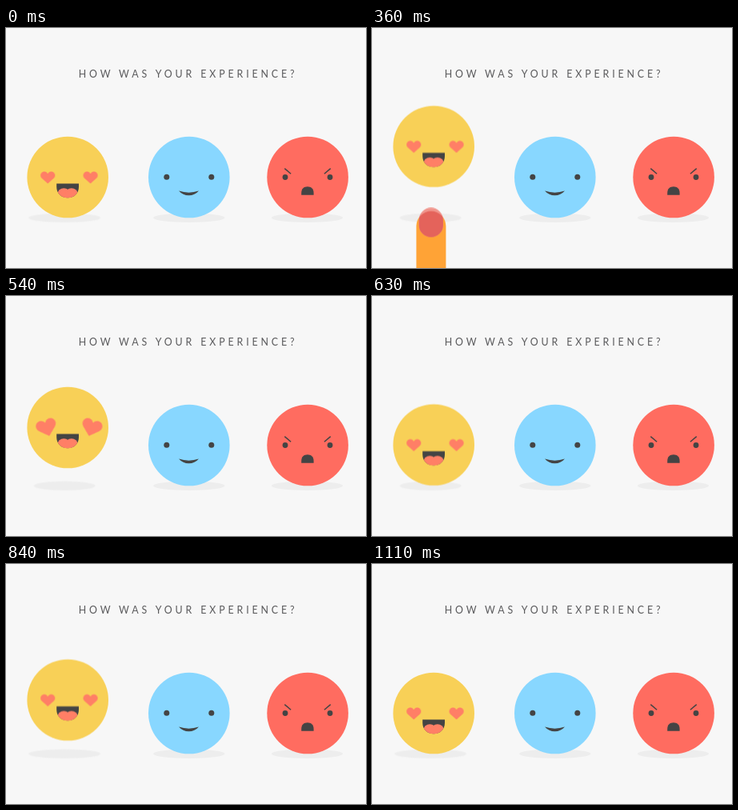
Recreate the animation shown at these times as an HTML page without scripts. Size 450 px wide and 300 px high, loop 3600 ms.

```html
<!DOCTYPE html>
<html lang="en">
<head>
<meta charset="utf-8">
<title>How was your experience?</title>
<style>
  html, body { margin: 0; width: 100%; height: 100%; overflow: hidden; background: #f7f7f7; }
  svg { display: block; width: 100vw; height: 100vh; }

  .title { font: 400 12.4px Lato, sans-serif; letter-spacing: 3.87px; fill: #5a5a5c; text-anchor: middle; }
  .shade { fill: #ededed; }
  .dark { fill: #444; }
  .heart, .tongue { fill: #ff7f66; }
  .brow { stroke: #444; stroke-width: 1.5; }

  .love, .love-shade, .heart, .finger { animation: 3600ms linear infinite; }
  .love { animation-name: bounce; }
  .love-shade { animation-name: shrink; }
  .heart { animation-name: pop; }
  .finger { animation-name: poke; }

  /* three bounces, each lower than the last; quadratic rise and fall */
  @keyframes bounce {
    8.1%, 17.583%, 26.806% { transform: translateY(0); animation-timing-function: cubic-bezier(.333, .667, .667, 1); }
    11.806%, 22.222%, 28.75% { animation-timing-function: cubic-bezier(.333, 0, .667, .333); }
    0% { transform: translateY(0); }
    11.806% { transform: translateY(-50px); }
    22.222% { transform: translateY(-22px); }
    28.75% { transform: translateY(-4px); }
    30.833%, 100% { transform: translateY(0); }
  }
  @keyframes shrink {
    0%, 8.1% { transform: scaleX(1); animation-timing-function: ease-out; }
    10%, 17.5% { transform: scaleX(.855); animation-timing-function: ease-in-out; }
    20.8%, 100% { transform: scaleX(1); }
  }
  @keyframes pop {
    0%, 10.2% { transform: translate(0, 0) rotate(0deg) scale(1); animation-timing-function: ease-out; }
    13.2%, 14% { transform: translate(-1.5px, 0) rotate(-22deg) scale(1.5); animation-timing-function: ease-in-out; }
    17.3%, 100% { transform: translate(0, 0) rotate(0deg) scale(1); }
  }
  @keyframes poke {
    0%, 3.2% { transform: translateY(80px); animation-timing-function: cubic-bezier(.333, .667, .667, 1); }
    7.917% { transform: translateY(-21px); animation-timing-function: cubic-bezier(.333, 0, .667, .333); }
    12.5%, 100% { transform: translateY(80px); }
  }
</style>
</head>
<body>
<svg viewBox="0 0 450 300">
  <defs>
    <path id="heart" d="M0 7.5L-7.5 .8C-11.2-3-7.8-8.6-3.2-7.4Q-1-6.8 0-4.8Q1-6.8 3.2-7.4C7.8-8.6 11.2-3 7.5 .8Z"/>
    <path id="grin" d="M63.2 194.5H91V198.5C91 207 85 212.3 77.1 212.3S63.2 207 63.2 198.5Z"/>
    <rect id="digit" x="55.4" y="228.5" width="37" height="180" rx="18.5"/>
    <rect id="nail" x="58.7" y="224.3" width="30.2" height="36.7" rx="15.1"/>
    <clipPath id="in-grin"><use href="#grin"/></clipPath>
    <clipPath id="in-digit"><use href="#digit"/></clipPath>
  </defs>

  <text class="title" x="227.6" y="62">HOW WAS YOUR EXPERIENCE?</text>

  <g transform="translate(73.2 237.3)"><ellipse class="shade love-shade" rx="45" ry="5.7"/></g>
  <ellipse class="shade" cx="228.8" cy="237.3" rx="44.7" ry="5.7"/>
  <ellipse class="shade" cx="376.5" cy="237.3" rx="44.7" ry="5.7"/>

  <g class="love">
    <circle cx="77.2" cy="186.5" r="50.8" fill="#f8d057"/>
    <g transform="translate(52.2 187)"><use class="heart" href="#heart"/></g>
    <g transform="translate(105.6 187) scale(-1 1)"><use class="heart" href="#heart"/></g>
    <use class="dark" href="#grin"/>
    <g class="tongue" clip-path="url(#in-grin)">
      <ellipse cx="72.3" cy="206.8" rx="7.8" ry="6.5"/>
      <ellipse cx="81.9" cy="206.8" rx="7.8" ry="6.5"/>
      <rect x="72" y="207" width="10" height="6"/>
    </g>
  </g>

  <g class="dark">
    <circle cx="228.8" cy="186.5" r="50.8" fill="#88d7ff"/>
    <circle cx="200.8" cy="186.3" r="3.5"/>
    <circle cx="256.8" cy="186.3" r="3.5"/>
    <path d="M216 203.5Q228.5 207.8 241 203.5Q236 209.3 228.5 209.3T216 203.5Z"/>
  </g>

  <g class="dark">
    <circle cx="377.1" cy="186.5" r="50.8" fill="#ff6c60"/>
    <circle cx="349" cy="186.5" r="3.4"/>
    <circle cx="405" cy="186.5" r="3.4"/>
    <path class="brow" d="M348.3 175.6L356.1 182.3M405.7 175.6L397.9 182.3"/>
    <path d="M369.2 208.8V206C369.2 201 372.5 198.3 376.9 198.3S384.6 201 384.6 206V208.8Z"/>
  </g>

  <g class="finger">
    <use href="#digit" fill="#ffa336"/>
    <use href="#nail" fill="#f0958c"/>
    <g clip-path="url(#in-digit)"><use href="#nail" fill="#e4635b"/></g>
  </g>
</svg>
</body>
</html>
```
